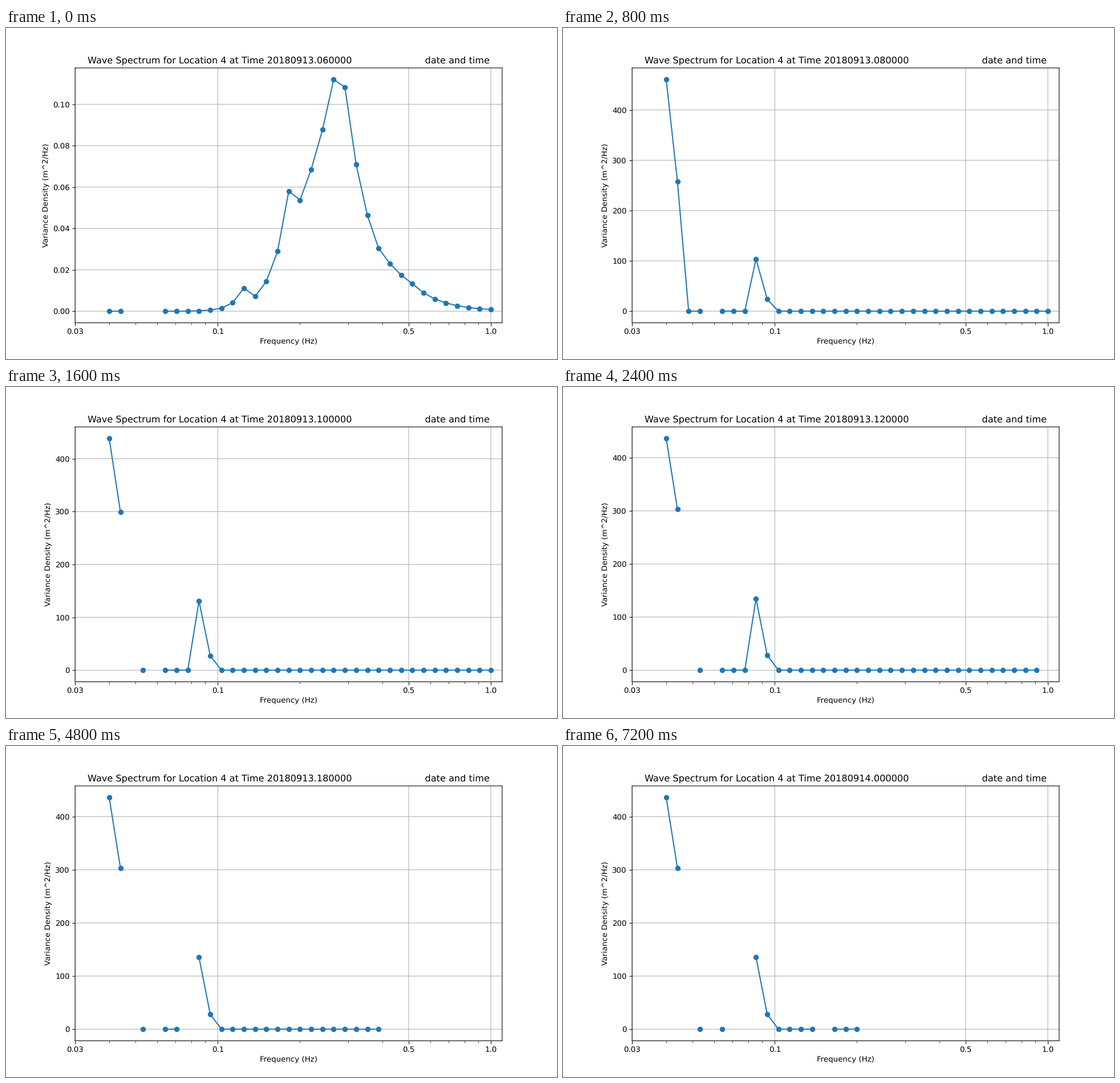
A matplotlib script for the animation above (7.6 s loop, 966 by 580 pixels).

```python
import numpy as np
import matplotlib.pyplot as plt
from matplotlib.animation import FuncAnimation
from matplotlib.ticker import NullFormatter

plt.rcParams["font.family"] = "DejaVu Sans"
plt.rcParams["text.hinting"] = "none"
plt.rcParams["path.snap"] = False  # keep lines at fractional pixels

HOURS = 19
START_HOUR = 6
BINS = np.arange(35)
FREQ = np.geomspace(0.04, 1.0, BINS.size)

# Turning points (bin, variance density) of the first hour
KEYS = [(8, 2e-4), (12, .0112), (13, .0072), (16, .0581), (17, .0537),
        (20, .1120), (21, .1083), (24, .0304), (27, .0133), (34, .0008)]

# Step from which a single bin has no value
HOLES = {4: 0, 2: 4, 7: 12, 6: 16, 14: 17}


def first_hour():
    bins, values = np.transpose(KEYS)
    density = np.exp(np.interp(BINS, bins, np.log(values)))
    density[:8] = 0
    density[2:4] = np.nan
    return density


def settle(step, limit, change, ratio):
    """Approach the limit by a constant ratio per hour."""
    return limit + change * ratio ** (step - 1)


def later_hour(step):
    density = np.zeros(BINS.size)
    density[0] = settle(step, 436, 82, 0.3)
    density[1] = settle(step, 303.5, -150, 0.305)
    density[8] = settle(step, 135.4, -84, 0.375)
    density[9] = settle(step, 28.2, -12, 0.37)
    return density


def spectrum(step):
    density = later_hour(step) if step else first_hour()
    # The high end erodes quickly, then by slightly less than a bin per hour
    cutoff = np.interp(step, [5, 6, 8, 16, 17], [34, 33, 27.65, 20.85, 17])
    density[BINS > cutoff] = np.nan
    density[[b for b, start in HOLES.items() if step >= start]] = np.nan
    return density


def title(step):
    day, hour = divmod(START_HOUR + step, 24)
    stamp = f"{20180913 + day}.{hour:02d}0000"
    return (f"Wave Spectrum for Location 4 at Time {stamp}"
            + " " * 25 + "date and time")


fig, ax = plt.subplots(figsize=(10.0001, 6.0042), dpi=96.6)
fig.subplots_adjust(left=0.1254, right=0.9004, bottom=0.1094, top=0.8794)
line, = ax.plot(FREQ, spectrum(0), "o-", color="#1f77b4")
ax.set_xscale("log")
ax.set_xlim(0.03, 1.1)
ax.set_xticks([0.03, 0.1, 0.5, 1.0], ["0.03", "0.1", "0.5", "1.0"])
ax.xaxis.set_minor_formatter(NullFormatter())
ax.set_xlabel("Frequency (Hz)")
ax.set_ylabel("Variance Density (m^2/Hz)")
ax.grid(True)


def update(step):
    density = spectrum(step)
    peak = np.nanmax(density)
    line.set_ydata(density)
    ax.set_ylim(-0.05 * peak, 1.05 * peak)
    ax.set_title(title(step))
    return line,


anim = FuncAnimation(fig, update, frames=HOURS, interval=400,
                     repeat=True, repeat_delay=0, blit=False)
plt.show()
```
